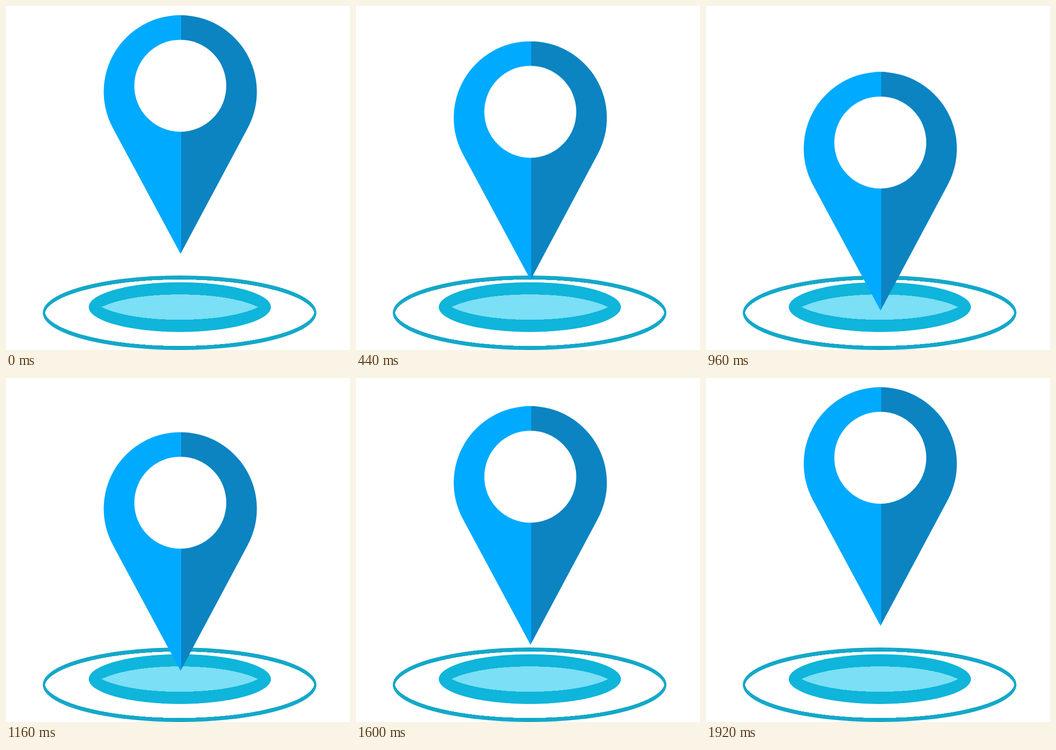
An HTML page for the animation above (1.96 s loop, 748x748 px).

```html
<!DOCTYPE html>
<html lang="en">
<head>
<meta charset="utf-8">
<title>Map pin</title>
<style>
  html, body { margin: 0; width: 100%; height: 100%; overflow: hidden; background: #fff; }
  svg { display: block; width: 100vw; height: 100vh; }
  .ripple { shape-rendering: crispEdges; }
  .pin { animation: bob 1960ms infinite; }

  /* 24 steps of 40 ms down, 24 back up, then one step of rest */
  @keyframes bob {
    0% { transform: translateY(0); animation-timing-function: steps(24, end); }
    48.97959% { transform: translateY(123.43px); animation-timing-function: steps(24, end); }
    97.95918%, 100% { transform: translateY(0); }
  }
</style>
</head>
<body>
<svg viewBox="0 0 748 748">
  <defs>
    <clipPath id="body">
      <path d="M379.5 539 L232.2 265.1 A166.5 166.5 0 1 1 525.8 265.1 Z"/>
    </clipPath>
  </defs>

  <!-- Each ellipse has a stroke kept inside its edge, then stretched vertically -->
  <g class="ripple">
    <clipPath id="ringEdge"><ellipse rx="297.5" ry="47.65"/></clipPath>
    <clipPath id="discEdge"><ellipse rx="198" ry="31.75"/></clipPath>
    <g transform="translate(377.5 667) scale(1 1.7)">
      <ellipse rx="297.5" ry="47.65" fill="none" stroke="#14a8c9" stroke-width="10.4" clip-path="url(#ringEdge)"/>
    </g>
    <g transform="translate(378 654.7) scale(1 1.7)">
      <ellipse rx="198" ry="31.75" fill="#7bdff5" stroke="#0fb5da" stroke-width="31.2" clip-path="url(#discEdge)"/>
    </g>
  </g>

  <g class="pin">
    <g clip-path="url(#body)">
      <rect x="200" y="10" width="181" height="540" fill="#00aaff"/>
      <rect x="381" y="10" width="180" height="540" fill="#0b84c1"/>
    </g>
    <circle cx="379" cy="173.4" r="100" fill="#fff"/>
  </g>
</svg>
</body>
</html>
```
